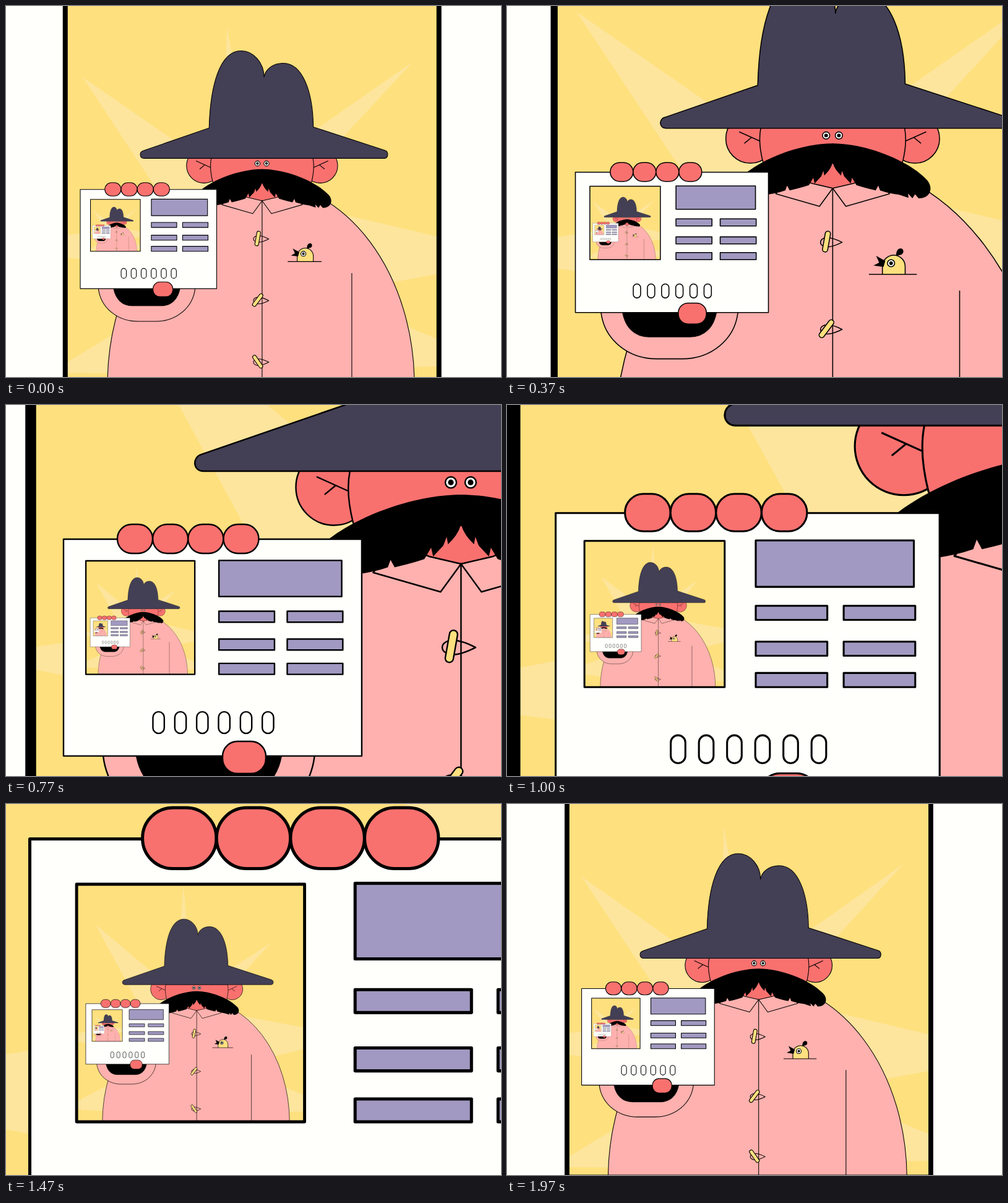
An HTML page for the animation above (2010 ms loop, 800 by 600 pixels).

```html
<!DOCTYPE html>
<html lang="en">
<head>
<meta charset="utf-8">
<title>Picture in a picture</title>
<style>
  html, body { margin: 0; width: 100%; height: 100%; overflow: hidden; background: #fffffc; }
  svg { display: block; width: 100vw; height: 100vh; }
  .ink { fill: none; }
  .pink { fill: #feb1ae; }
  .red { fill: #f9716f; }
  .white { fill: #fffffc; }
  .yellow { fill: #fee07e; }
  .mauve { fill: #a199c1; }
  .black { fill: #000; }
  .bare { stroke: none; }
</style>
</head>
<body>
<svg viewBox="0 0 800 600" preserveAspectRatio="none">
  <defs>
    <clipPath id="photo"><rect x="95.75" y="-20" width="604" height="630"/></clipPath>
    <g id="scene" stroke="#000" stroke-width="1.1" stroke-linejoin="round">
      <rect class="yellow bare" x="95" y="-21" width="606" height="632"/>
      <path id="rays" class="bare" fill="#fde59d"/>
      <g id="man"></g>
      <g id="card"></g>
    </g>
  </defs>
  <g id="world"></g>
</svg>
<script>
const LOOP = 2010, FRAMES = 60, RATIO = 7.5, DEPTH = 4;
const FOCUS = [142.8, 363.9];
const MID = 413.9;
const $ = id => document.getElementById(id);

const path = (cls, d, extra = '') => `<path class="${cls}" d="${d}" ${extra}/>`;
const circle = (cls, x, y, r) => `<circle class="${cls}" cx="${x}" cy="${y}" r="${r}"/>`;
const box = (cls, x, y, w, h, r = 0) =>
  `<rect class="${cls}" x="${x}" y="${y}" width="${w}" height="${h}" rx="${r}"/>`;
const repeat = (n, draw) => Array.from({ length: n }, (_, i) => draw(i)).join('');
const mirrored = art => art + `<g transform="translate(${2 * MID}) scale(-1 1)">${art}</g>`;
const zoom = k => `translate(${FOCUS}) scale(${k}) translate(${-FOCUS[0]} ${-FOCUS[1]})`;
const eye = (x, y) => circle('white', x, y, 4.1) + circle('black bare', x, y, 2.1);

function toggle(y, angle) {
  return path('ink', `M424.7 ${y}q-12.7 -6.5 -19.7 -5q-5 1.5 -5 5t5 5q7 1.5 19.7 -5z`) +
    `<g transform="translate(406.8 ${y - .8}) rotate(${angle})">${box('yellow', -3, -12, 6, 24, 3)}</g>`;
}

function man() {
  const ear = circle('red', 319.9, 258.3, 28.1) +
    path('ink', 'M307.1 250.5L330.4 261M321.3 256.9L313 263.7');
  const collar = path('pink', 'M390.4 309.5L413.9 315L398.8 335.7L349 321.4L365 300Z');
  const whisker = path('black bare', `M413.5 263.7C452 263.7 501 283 522 306C530 316 524 327 512 326.5
    L508 322L505 326.5L500 321L500.5 326L490 322.5Q478 321 468 317.5L466 312L463 317.5Q450 314.5 441 311.5
    L436 303L434.5 309.5L427 301.5L424.5 295L423.5 300.5Q416.5 294 414.3 287L413.5 287Z`);
  return path('pink', 'M164 612A248 328 0 0 1 660 612') +
    path('ink', 'M558.9 432V612') +
    mirrored(ear) +
    path('red', 'M331.8 246Q328.5 262 334 284Q345 315 414 315Q483 315 494 284Q499.3 262 496 246Z') +
    mirrored(collar) +
    path('ink', `M${MID} 315V612`) +
    eye(406.4, 254.7) + eye(421, 254.7) +
    mirrored(whisker) +
    path('', `M223.5 246.4C215.5 246.4 215 236 222 234L328.3 197.3C330 130 345 72.5 380 72.5
      C400 72.5 417 92 417 115C419 102 432 92.5 448 92.5C480 92.5 496 140 496.7 195.7L612.5 233.5
      C619 236 618 246.4 611 246.4Z`, 'fill="#433f55"') +
    toggle(376.8, 10) + toggle(476.4, 37) + toggle(576, -35) +
    path('yellow', 'M470.7 413.4V404.5A13 13 0 0 1 496.7 404.5V413.4') +
    path('ink', 'M455.3 413.4H510') +
    path('black bare', 'M474 398L463.5 392.2L467 400L460.5 403.4L472 405Z') +
    path('black bare', 'M486.5 392.5C486 386 489 383.5 492 383.7C496 384.5 495.5 391 490.5 391.3Z') +
    eye(480.6, 400.7);
}

function card() {
  const rows = [350, 370.6, 388.6];
  return path('pink', 'M149.3 457C153 488 180 510 213 510H242C275 510 302 488 305.6 457') +
    path('black', 'M174 457C177 473 187 484.8 204 484.8H251C268 484.8 278 473 281 457') +
    box('white', 120, 296.7, 220.5, 160.4) +
    box('mauve', 234.9, 312.4, 90.8, 26.7) +
    rows.map(y => box('mauve', 234.9, y, 41.1, 8.1) + box('mauve', 285.4, y, 41.1, 8.1)).join('') +
    repeat(6, i => box('white', 186.1 + i * 16.17, 424.4, 8.4, 16, 4.2)) +
    repeat(4, i => box('red', 159.8 + i * 26.15, 285.7, 26.1, 21.5, 10.7)) +
    box('red', 237.6, 446.3, 32, 23.8, 11);
}

function level(n) {
  if (!n) return '';
  return `<g clip-path="url(#photo)"><use href="#scene"/><g transform="${zoom(1 / RATIO)}">${level(n - 1)}</g></g>
    <rect x="95.75" y="-20" width="604" height="630" fill="none" stroke="#000" stroke-width="8" stroke-linejoin="round"/>`;
}

// Smooth curve through (KEYS, values); each pass of the loop adds `gain`.
const KEYS = [0, 11, 23, 37, 44, 52, 59];
function curve(values, frame, gain = 0) {
  const n = KEYS.length;
  const wrap = i => Math.floor(i / n);
  const at = i => KEYS[i - wrap(i) * n] + wrap(i) * FRAMES;
  const val = i => values[i - wrap(i) * n] + wrap(i) * gain;
  const rate = i => (val(i + 1) - val(i)) / (at(i + 1) - at(i));
  const slope = i => {
    const before = at(i) - at(i - 1), after = at(i + 1) - at(i);
    return (after * rate(i - 1) + before * rate(i)) / (before + after);
  };
  let i = n - 1;
  while (KEYS[i] > frame) i--;
  const h = at(i + 1) - at(i), u = (frame - at(i)) / h, v = 1 - u;
  return v * v * (1 + 2 * u) * val(i) + u * u * (1 + 2 * v) * val(i + 1) +
    h * u * v * (v * slope(i) - u * slope(i + 1));
}

const ZOOM_LOG = [0, .347, .782, 1.2825, 1.5207, 1.7796, 1.988];

// Each ray tapers from a base of half width w around its root to a drifting tip.
const RAYS = [
  { root: [395, 393], w: 75, x: [124, 121, 154, 170, 146, 124, 120], y: [115, 113, 103, 147, 87, 116, 111] },
  { root: [380, 345], w: 31, x: [357, 360, 378, 397, 379, 354, 356], y: [33, 30, 15, -20, -16, 24, 28] },
  { root: [398, 316], w: 37, x: [658, 650, 593, 591, 610, 652, 654], y: [90, 95, 141, 147, 136, 94, 90] },
  { root: [398, 396], w: 93, x: [842, 842, 830, 850, 830, 842, 842], y: [407, 407, 400, 370, 385, 403, 407] },
  { root: [398, 506], w: 87, x: [796], y: [580] },
  { root: [398, 503], w: 97, x: [71, 71, 40, 10, 60, 71, 71], y: [593, 593, 565, 540, 575, 592, 593] },
  { root: [398, 390], w: 60, x: [-30, -30, 50, -20, 30, -28, -30], y: [388, 388, 384, 411, 385, 387, 388] }
];

function rayPath({ root, w, x, y }, frame) {
  const pick = list => list.length > 1 ? curve(list, frame) : list[0];
  const tx = pick(x), ty = pick(y);
  const dx = root[0] - tx, dy = root[1] - ty, len = Math.hypot(dx, dy);
  const nx = -dy / len * w, ny = dx / len * w;
  return `M${tx} ${ty}L${root[0] + nx} ${root[1] + ny}L${root[0] - nx} ${root[1] - ny}Z`;
}

$('man').innerHTML = man();
$('card').innerHTML = card();
$('world').innerHTML = level(DEPTH);

function draw(ms) {
  const frame = Math.min(FRAMES - 1, Math.floor((ms % LOOP + 3.4) * .03));
  $('rays').setAttribute('d', RAYS.map(ray => rayPath(ray, frame)).join(''));
  $('world').setAttribute('transform', zoom(Math.exp(curve(ZOOM_LOG, frame, Math.log(RATIO)))));
}

const start = performance.now();
function tick() {
  draw(performance.now() - start);
  requestAnimationFrame(tick);
}
tick();
</script>
</body>
</html>
```
